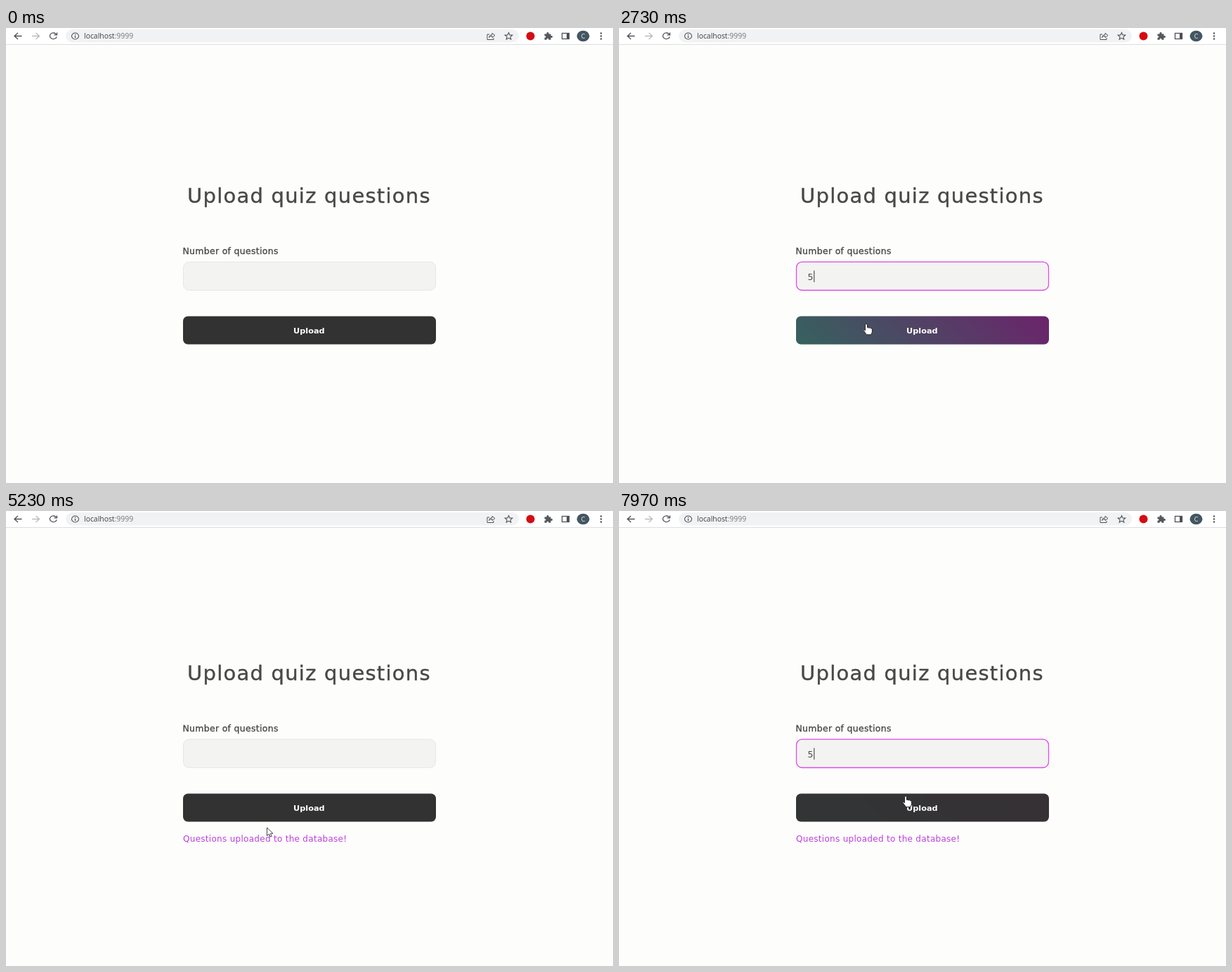
Recreate the animation shown at these times as an HTML page. Size 864 by 648 pixels, loop 8 s.

```html
<!DOCTYPE html>
<html lang="en">
<head>
<meta charset="utf-8">
<title>Upload quiz questions</title>
<style>
html, body { margin: 0; width: 100%; height: 100%; overflow: hidden; background: #fdfdfc; }
svg { display: block; width: 864px; height: 648px; }
text { font-family: "DejaVu Sans", sans-serif; fill: #484848; }
.title { font-size: 29px; letter-spacing: 1.25px; stroke: #484848; stroke-width: .4; }
.label { font-size: 12.4px; letter-spacing: .35px; stroke: #484848; stroke-width: .35; }
.action { font-size: 11.3px; font-weight: bold; fill: #fff; }
.value { font-size: 12.5px; }
.message { font-size: 12px; letter-spacing: .29px; fill: #bb3fdd; }
.url { font: 10.4px "Open Sans", sans-serif; fill: #3c4043; }
.item { font-size: 8.5px; text-anchor: middle; fill: #333; }
.line { fill: none; stroke: #4d5156; stroke-width: 1.3; }

/* Whole scene shares one 8 s clock; 1% = 80 ms */
.move { animation: 8s linear infinite; }
.step { animation: 8s step-end infinite; }

#form { animation-name: lift; }
@keyframes lift { 0% { transform: none; } 57%, 100% { transform: translateY(-8px); } }

#message { animation-name: message; }
@keyframes message { 0% { opacity: 0; } 57%, 100% { opacity: 1; } }

#value { animation-name: value; }
@keyframes value { 0% { opacity: 0; } 25.4% { opacity: 1; } 57% { opacity: 0; } 95.1%, 100% { opacity: 1; } }

#caret { animation-name: caret; }
@keyframes caret {
  0% { opacity: 0; transform: none; }
  14.5% { opacity: 1; transform: none; }
  25.4% { opacity: 1; transform: translateX(9px); }
  36.5% { opacity: 0; transform: none; }
  83.7% { opacity: 1; transform: none; }
  95.1%, 100% { opacity: 1; transform: translateX(9px); }
}

#hover { animation-name: hover; }
@keyframes hover {
  0%, 6.75% { opacity: 0; }
  8.2% { opacity: .5; }
  9.8%, 33.1% { opacity: 0; }
  36.8%, 53.9% { opacity: 1; }
  57.6%, 79% { opacity: 0; }
  80.9% { opacity: .5; }
  82.8%, 99.37% { opacity: 0; }
  100% { opacity: .04; }
}

/* The focus ring closes in on the field and opens out again on blur */
#ring { animation-name: ring; }
@keyframes ring {
  0%, 14.2% { x: 230px; y: 316px; width: 404px; height: 75px; opacity: 0; }
  14.3%, 83.7% { x: 230px; y: 316px; width: 404px; height: 75px; opacity: .15;
    animation-timing-function: cubic-bezier(.1, .9, .3, 1); }
  19.1%, 36.5%, 88.6%, 100% { x: 252.5px; y: 333.2px; width: 359px; height: 40.3px; opacity: 1; }
  41.5%, 83.6% { x: 230px; y: 316px; width: 404px; height: 75px; opacity: 0; }
}

#first { animation-name: first; }
@keyframes first {
  0%, 24.1% { opacity: 0; }
  24.8%, 25.4% { opacity: 1; }
  26.45%, 100% { opacity: 0; }
}
#second { animation-name: second; }
@keyframes second {
  0%, 83.7% { opacity: 0; }
  84.9%, 95.1% { opacity: 1; }
  96.6%, 100% { opacity: 0; }
}

#loader { animation-name: loader; }
@keyframes loader { 0% { opacity: 0; } 37% { opacity: 1; } 57%, 100% { opacity: 0; } }
#arc { animation: turn 1s linear -.27s infinite; }
@keyframes turn { to { stroke-dashoffset: -100; } }

#pointer { animation-name: travel; }
@keyframes travel {
  0%, 4.6% { transform: translate(806px, 486px); }
  6.75% { transform: translate(612px, 441px); }
  8.2% { transform: translate(490px, 411px); }
  9.6% { transform: translate(364px, 380px); }
  14.2%, 24% { transform: translate(320px, 353px); }
  25.8%, 28% { transform: translate(325px, 357px); }
  34% { transform: translate(352px, 420px); }
  36%, 50% { transform: translate(351px, 438px); }
  54%, 58% { transform: translate(371px, 451px); }
  61% { transform: translate(378px, 472px); }
  65%, 66% { transform: translate(371px, 451px); }
  69% { transform: translate(488px, 470px); }
  72% { transform: translate(400px, 496px); }
  75% { transform: translate(210px, 480px); }
  76.3% { transform: translate(245px, 470px); }
  79% { transform: translate(318px, 443px); }
  82% { transform: translate(334px, 380px); }
  83%, 95.5% { transform: translate(336px, 360px); }
  98% { transform: translate(385px, 385px); }
  99.6%, 100% { transform: translate(408px, 406px); }
}
#arrow { animation-name: arrow; }
@keyframes arrow {
  0%, 6.75%, 10.8%, 33.1%, 79%, 82.7%, 99.37%, 100% { opacity: 0; }
  4.6%, 8.2%, 29.6%, 53.9%, 80.9%, 96.1% { opacity: 1; }
}
#hand { animation-name: hand; }
@keyframes hand {
  0%, 8.2%, 53.9%, 80.9% { opacity: 0; }
  6.75%, 33.1%, 79%, 99.37%, 100% { opacity: 1; }
}
#beam { animation-name: beam; }
@keyframes beam {
  0%, 29.6%, 96.1%, 100% { opacity: 0; }
  10.8%, 82.7% { opacity: 1; }
}
</style>
</head>
<body>
<svg viewBox="0 0 864 648">
  <defs>
    <linearGradient id="glow" gradientUnits="userSpaceOnUse" x1="332" y1="531" x2="532" y2="331">
      <stop stop-color="#40e0d0"/><stop offset="1" stop-color="#f0f"/>
    </linearGradient>
    <g id="panel">
      <path d="M330.5 382q0-2 2-2h7l5.500-4 5.500 4h15q2 0 2 2v97q0 2-2 2h-33q-2 0-2-2z" fill="#fff" stroke="#e6e6ea"/>
      <text class="item" x="342.500" y="398.500">1</text>
      <text class="item" x="342.500" y="422">2</text>
    </g>
  </defs>

  <rect width="864" height="648" fill="#fdfdfc"/>

  <g id="toolbar">
    <rect width="864" height="23" fill="#fff"/>
    <path d="M0 23.500H864" stroke="#dddde0"/>
    <rect x="85" y="2" width="645" height="18.500" rx="9.500" fill="#f1f2f4"/>
    <path class="line" d="M22.500 11.500H12.500M17 7l-5 4.500 5 4.500"/>
    <path class="line" d="M37 11.500H47M42.500 7l5 4.500-5 4.500" style="stroke:#b9bbbe"/>
    <path class="line" d="M71.500 8.800A5 4.300 0 1 0 72.200 12.500M72.500 6.500V9.800H68.500"/>
    <ellipse class="line" cx="98.500" cy="11.500" rx="5" ry="4.500" style="stroke-width:1.100"/>
    <path class="line" d="M98.500 11V14M98.500 8.800V9.900"/>
    <text class="url" x="111" y="15">localhost<tspan fill="#74777b">:9999</tspan></text>
    <path class="line" style="stroke-width:1" d="M688 9H685V16.500H694V14M687.500 13.500Q688 9.500 692 9.500V7.300L696 10.500 692 13.500V11.500Q689 11.500 687.500 13.500Z"/>
    <path class="line" style="stroke-width:1.100" d="M715.500 6.500l1.500 3.400 3.800.3-2.900 2.500.9 3.500-3.300-1.900-3.300 1.900.9-3.500-2.900-2.500 3.800-.3z"/>
    <circle cx="746.500" cy="11.500" r="6" fill="#d40d12"/>
    <path fill="#54585c" d="M766.500 8.500h3q-.5-2.500 1.500-2.500t1.500 2.500h3v2.700q2.500-.5 2.500 1.300t-2.500 1.300v3h-3q0-2-1.500-2t-1.500 2h-3v-3q2 0 2-1.300t-2-1.300z"/>
    <rect class="line" x="791.500" y="7.500" width="10" height="8"/>
    <path d="M798 7h4v9h-4z" fill="#4d5156"/>
    <ellipse cx="821.500" cy="11.500" rx="9" ry="7.700" fill="#435661"/>
    <text x="821.500" y="14.500" text-anchor="middle" style="font-size:8px;fill:#e8edf0">C</text>
    <g fill="#4d5156">
      <circle cx="847" cy="7.500" r="1.200"/><circle cx="847" cy="11.500" r="1.200"/><circle cx="847" cy="15.500" r="1.200"/>
    </g>
  </g>

  <g id="form" class="step">
    <text class="title" x="258" y="249">Upload quiz questions</text>
    <text class="label" x="251.500" y="322">Number of questions</text>
    <rect x="252.500" y="333.200" width="359" height="40.300" rx="8" fill="#f3f3f2" stroke="#e6e6ec"/>
    <rect id="ring" class="move" rx="8" fill="none" stroke="#e04be6" stroke-width="1.300"/>
    <text id="value" class="value step" x="268.500" y="358.500">5</text>
    <path id="caret" class="step" d="M268.800 345.500V362" stroke="#333"/>

    <rect x="252" y="410.500" width="360" height="40" rx="7" fill="#323232"/>
    <rect id="hover" class="move" x="252" y="410.500" width="360" height="40" rx="7" fill="url(#glow)"/>
    <text class="action" x="409" y="435">Upload</text>
    <text id="message" class="message step" x="252" y="479">Questions uploaded to the database!</text>

    <g id="first" class="move">
      <use href="#panel"/>
      <text class="item" x="342.500" y="445.500">0</text>
      <text class="item" x="342.500" y="469">5</text>
    </g>
    <g id="second" class="move">
      <use href="#panel"/>
      <text class="item" x="342.500" y="446">5</text>
      <text class="item" x="342.500" y="470">0</text>
    </g>
  </g>

  <g id="loader" class="step" fill="none" stroke-width="2">
    <ellipse cx="432" cy="336" rx="26.500" ry="22.500" stroke="#cbc8c8"/>
    <ellipse id="arc" cx="432" cy="336" rx="26.500" ry="22.500" stroke="#a122df" pathLength="100" stroke-dasharray="50 50"/>
  </g>

  <g id="pointer" class="move">
    <path id="arrow" class="step" d="M.5 0V11.500L3.300 9 5.200 13 7.200 12.300 5.400 8.300H9z" fill="#fff" stroke="#333" stroke-width=".9"/>
    <path id="hand" class="step" d="M-1.500 1Q0-1 1.500 1V5.500Q3 4.500 4 6 5.500 5 6.500 6.500 8.500 6 8.500 8V11.500L7 15.500H.5L-4 9.500Q-3.500 7.500-1.500 9.500Z" fill="#fff" stroke="#222"/>
    <path id="beam" class="step" d="M-3-5.500Q0-5.500 0-4.500 0-5.500 3-5.500M0-4.500V4.500M-3 5.500Q0 5.500 0 4.500 0 5.500 3 5.500" fill="none" stroke="#333" stroke-width="1.100"/>
  </g>
</svg>
</body>
</html>
```
